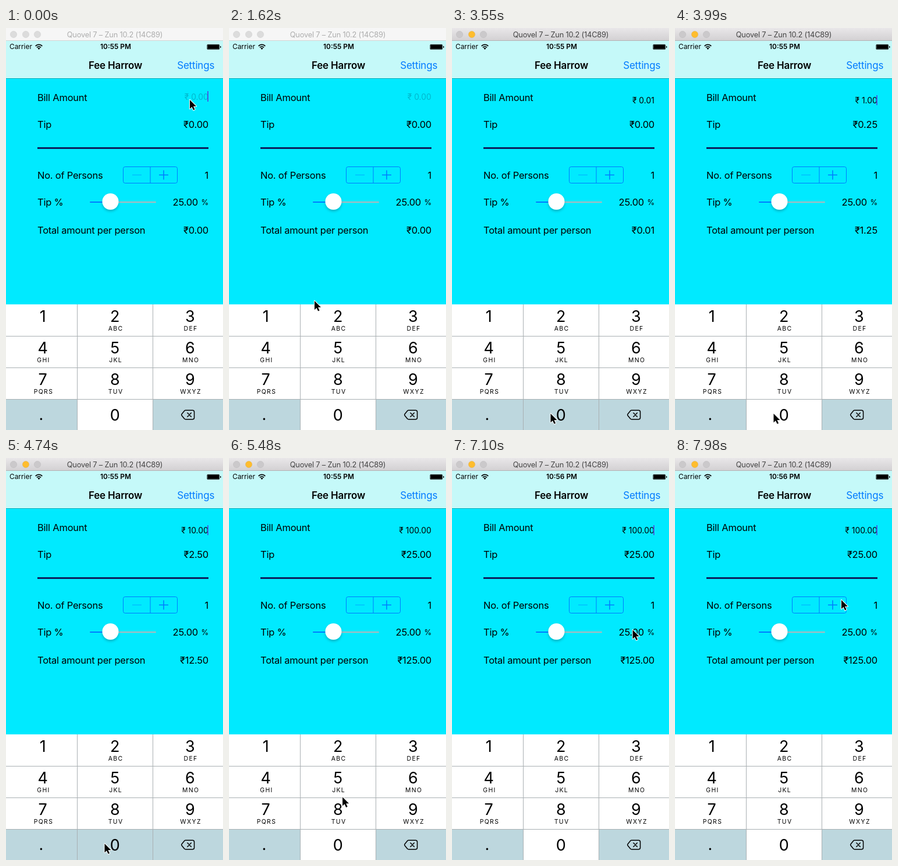
These frames come from a looping animation (373 px wide and 688 px high, 8000 ms). An HTML page:

```html
<!DOCTYPE html>
<html lang="en">
<head>
<meta charset="utf-8">
<title>Tip calculator</title>
<style>
  html, body { margin: 0; width: 100%; height: 100%; overflow: hidden; background: #00eaff; }
  svg { display: block; width: 373px; height: 688px; }
  text { font-family: Inter, "Noto Sans", sans-serif; font-size: 16.5px; letter-spacing: -0.014em; white-space: pre; }
  .end { text-anchor: end; }
  .mid { text-anchor: middle; }
  .nav { font-size: 17px; letter-spacing: -0.01em; }
  .small { font-size: 13.9px; letter-spacing: 0; }
  .bold { font-weight: 600; }
  .status { font-size: 11.9px; letter-spacing: 0; }
  .digit { font-size: 27px; letter-spacing: 0; text-anchor: middle; }
  .letters { font-size: 10.5px; letter-spacing: 1.3px; text-anchor: middle; }
  .blue { fill: #007aff; }
  .line { fill: none; stroke: #007aff; }
</style>
</head>
<body>
<svg viewBox="0 0 373 688" xmlns="http://www.w3.org/2000/svg">
  <defs>
    <linearGradient id="activeBar" x2="0" y2="1">
      <stop stop-color="#e9e7e9"/><stop offset="1" stop-color="#d2d0d2"/>
    </linearGradient>
    <filter id="shadow" x="-50%" y="-50%" width="200%" height="200%">
      <feDropShadow dx="0" dy="2.5" stdDeviation="2" flood-color="#000" flood-opacity=".25"/>
    </filter>
  </defs>
  <rect width="373" height="688" fill="#00eaff"/>

  <rect id="bar" width="373" height="22"/>
  <rect id="barEdge" y="21" width="373" height="1"/>
  <g id="lights" stroke="#000" stroke-opacity=".06"><circle cx="13" cy="11" r="5.7"/><circle cx="34" cy="11" r="5.7"/><circle cx="54" cy="11" r="5.7"/></g>
  <text id="windowTitle" class="mid" x="187" y="16" style="font-size:12.8px">Quovel 7 – Zun 10.2 (14C89)</text>

  <rect y="22" width="373" height="64" fill="#c5f9f9"/>
  <rect y="86" width="373" height="1" fill="#000" opacity=".28"/>
  <text class="status" x="6" y="36.3">Carrier</text>
  <g fill="none" stroke="#000" stroke-width="1.8">
    <path d="M50.7 30.8a8.3 8.3 0 0 1 11.6 0M53 33.3a5 5 0 0 1 7 0"/>
    <path d="M56.5 37l-2.1-2.2a3 3 0 0 1 4.2 0z" fill="#000" stroke="none"/>
  </g>
  <text id="clock" class="status bold mid" x="188.5" y="36.3"></text>
  <rect x="345.5" y="28" width="21.5" height="8.8" rx="1.5"/>
  <rect x="346.5" y="29" width="19.5" height="6.8" rx="1" fill="none" stroke="#c5f9f9" stroke-width=".5" opacity=".5"/>
  <path d="M368 30.6q1.6.4 1.6 1.8t-1.6 1.8z"/>
  <text class="nav bold mid" x="188" y="70">Fee Harrow</text>
  <text class="nav end blue" x="358.3" y="70">Settings</text>

  <text x="54" y="124.5">Bill Amount</text>
  <text id="bill" class="end small" x="347.8"></text>
  <rect id="caret" x="346" width="2" fill="#4260e8"/>
  <text x="54" y="170.5">Tip</text>
  <text id="tip" class="end" x="348" y="170.5"></text>
  <rect x="54" y="204" width="294" height="3" fill="#0b1f5e"/>

  <text x="54" y="257.5">No. of Persons</text>
  <rect class="line" x="201.5" y="237.5" width="93" height="28" rx="3.2"/>
  <path class="line" d="M248 237.5v28"/>
  <path class="line" d="M217 251.5h16" stroke-width="1.5" opacity=".4"/>
  <path class="line" d="M263 251.5h16M271 243.5v16" stroke-width="1.5"/>
  <text class="end" x="348" y="257.5">1</text>

  <text x="54" y="303.5">Tip %</text>
  <rect x="144" y="297" width="114" height="2" rx="1" fill="#b5b7ba"/>
  <rect class="blue" x="144" y="297" width="36" height="2" rx="1"/>
  <circle cx="179.5" cy="297" r="14" fill="#fff" filter="url(#shadow)"/>
  <text class="end" x="330" y="303.5">25.00</text>
  <text class="end" x="348" y="302.5" style="font-size:13px">%</text>

  <text x="54" y="351.5">Total amount per person</text>
  <text id="total" class="end" x="348" y="351.5"></text>

  <g id="keys"></g>
  <path d="M122.5 473V688M252.5 473V688M0 527.5H373M0 581.5H373M0 635.5H373" stroke="#a9b0b3" fill="none"/>
  <g fill="none" stroke="#000" stroke-width="1.5" stroke-linejoin="round" stroke-linecap="round" transform="translate(-.4)">
    <path d="M309 654.3h12q3 0 3 3v9.4q0 3-3 3h-12q-1.2 0-2-.9l-4.5-5.6q-.9-1.2 0-2.4l4.5-5.6q.8-.9 2-.9z"/>
    <path d="M312.3 658.8l6.4 6.4m0-6.4l-6.4 6.4"/>
  </g>
  <path id="cursor" d="M0 0V15.2L3.5 11.9L6.1 17.6L8.6 16.5L6 10.9H11z" stroke="#fff" stroke-width="2" stroke-linejoin="round" paint-order="stroke"/>
</svg>
<script>
const LOOP = 8000, TICK = 147.5;
const ACTIVATED = 14, NEW_MINUTE = 47;
const $ = id => document.getElementById(id);

// Entered cents, by the tick at which each key takes effect.
const entries = [[18, 1], [25, 10], [27, 100], [31, 1000], [33, 10000]];
const presses = { 1: [17, 18], 0: [24, 26, 30, 32] };

// Pointer stops: tick, x, y.
const path = [
  [0, 316, 123], [6, 316, 123], [10, 297, 270], [11, 147, 467], [12, 147, 467],
  [15, 71.5, 507.5], [19, 71.5, 507.5], [20, 78, 512], [24, 169.5, 660], [35, 169.5, 660],
  [43, 333.5, 150], [51, 300, 361], [54, 286, 243]
];

const labels = ['', 'ABC', 'DEF', 'GHI', 'JKL', 'MNO', 'PQRS', 'TUV', 'WXYZ'];
const columns = [[0, 122.5, 63.2], [122.5, 130, 187.3], [252.5, 120.5, 316.3]];
const keyText = (cls, x, y, str) => `<text class="${cls}" x="${x}" y="${y}">${str}</text>`;

function drawKey(name, i) {
  const [x, width, center] = columns[i % 3], row = Math.floor(i / 3), y = 473 + row * 54;
  const fill = i === 9 || i === 11 ? '#bdd7de' : '#fff';
  let out = `<rect id="key${name}" x="${x}" y="${y}" width="${width}" height="54" fill="${fill}"/>`;
  if (name === 'dot') out += keyText('digit', 60.5, 671, '.');
  else if (name === '0') out += keyText('digit', center, 672, '0');
  else if (name !== 'back') {
    out += keyText('digit', center, y + 29.7, name) + keyText('letters', center + 1.3, y + 45, labels[i]);
  }
  return out;
}
$('keys').innerHTML = [...'123456789', 'dot', '0', 'back'].map(drawKey).join('');

function pointer(tick) {
  const i = path.findIndex(stop => stop[0] > tick);
  if (i < 0) return path[path.length - 1].slice(1);
  const [t0, x0, y0] = path[i - 1], [t1, x1, y1] = path[i];
  const u = (tick - t0) / (t1 - t0), k = u * u * (3 - 2 * u);
  return [x0 + (x1 - x0) * k, y0 + (y1 - y0) * k];
}

function caretAlpha(age) {
  const phase = age % 1000;
  if (phase < 440) return 1;
  if (phase < 520) return (520 - phase) / 80;
  return Math.max(0, (phase - 900) / 100);
}

function render(time) {
  const tick = Math.floor((time % LOOP + 8) / TICK);
  const active = tick >= ACTIVATED;
  $('bar').setAttribute('fill', active ? 'url(#activeBar)' : '#f6f6f6');
  $('barEdge').setAttribute('fill', active ? '#b4b2b4' : '#d5d5d5');
  $('windowTitle').setAttribute('fill', active ? '#444' : '#adadad');
  [...$('lights').children].forEach((light, i) => {
    light.setAttribute('fill', !active ? '#dcdcdc' : i === 1 ? '#ffbd2e' : '#cbc9cb');
  });
  $('clock').textContent = tick < NEW_MINUTE ? '10:55 PM' : '10:56 PM';

  const [since, cents] = entries.filter(entry => entry[0] <= tick).pop() || [0, 0];
  const money = value => '₹' + value.toFixed(2);
  const amount = cents / 100;
  const bill = $('bill');
  bill.textContent = '₹ ' + amount.toFixed(2);
  bill.setAttribute('y', cents ? 129 : 123);
  bill.setAttribute('fill', cents ? '#000' : 'rgba(0,0,25,.22)');
  $('tip').textContent = money(amount * 0.25);
  $('total').textContent = money(amount * 1.25);

  const caret = $('caret');
  caret.setAttribute('y', cents ? 115 : 108);
  caret.setAttribute('height', cents ? 17 : 18);
  caret.setAttribute('opacity', caretAlpha((tick - since) * TICK + (cents ? 0 : 100)));

  for (const key in presses) {
    $('key' + key).setAttribute('fill', presses[key].includes(tick) ? '#bdd7de' : '#fff');
  }
  $('cursor').setAttribute('transform', `translate(${pointer(tick)})`);
}

const start = performance.now();
function loop() {
  render(performance.now() - start);
  requestAnimationFrame(loop);
}
loop();
</script>
</body>
</html>
```
